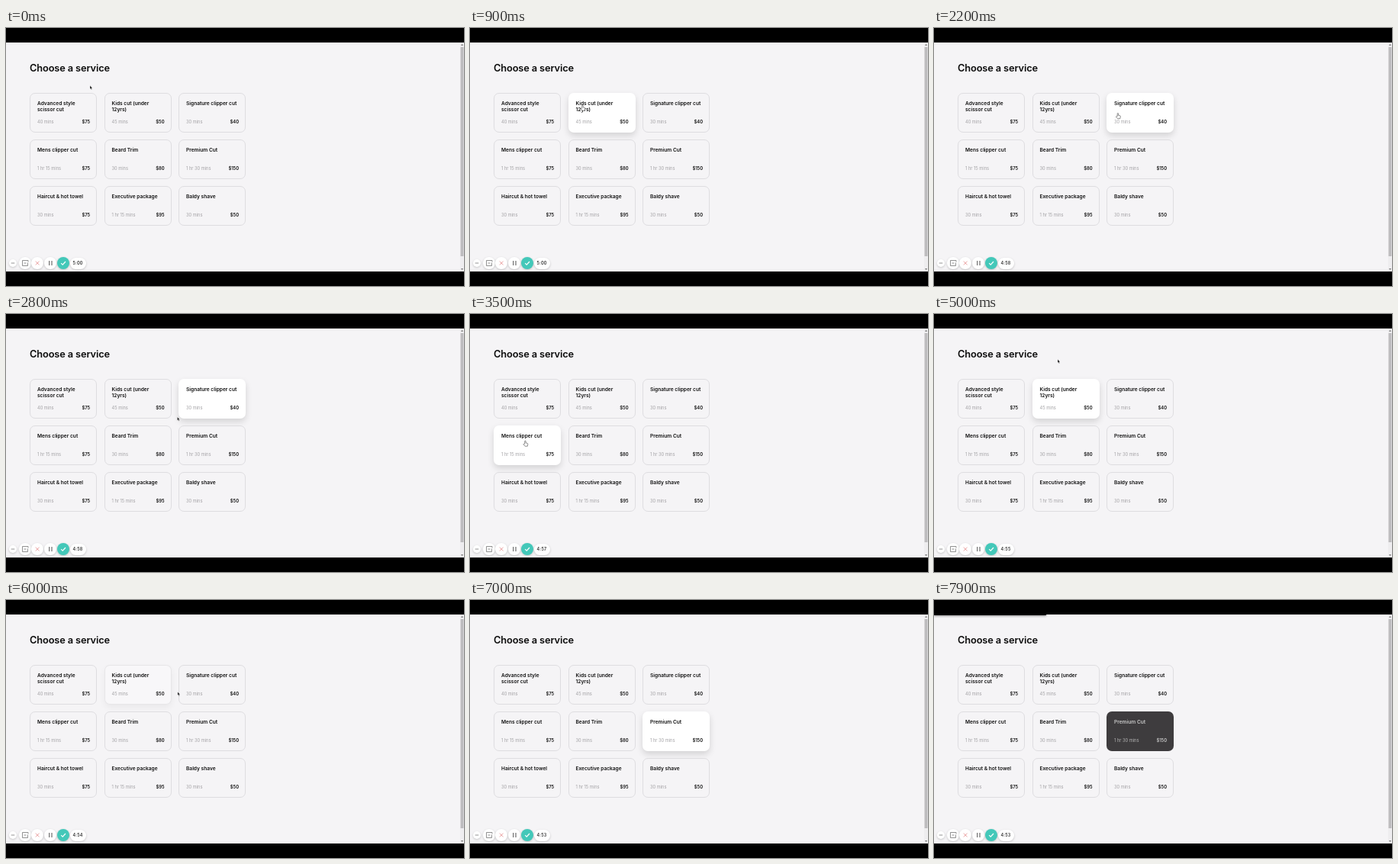
These frames come from a looping animation (600 by 338 pixels, 8 s). An HTML page:

```html
<!DOCTYPE html>
<html lang="en">
<head>
<meta charset="utf-8">
<title>Choose a service</title>
<style>
html, body { margin: 0; width: 100%; height: 100%; overflow: hidden; background: #000; }
#stage { position: relative; width: 600px; height: 338px; overflow: hidden; background: #000; font-family: Inter, sans-serif; color: #111; }
#stage * { position: absolute; box-sizing: border-box; white-space: nowrap; }
#page { left: 0; top: 19px; width: 600px; height: 300px; background: #f5f4f6; }
h1 { margin: 0; left: 31px; top: 44.5px; font: 600 12.8px/16px Inter, sans-serif; letter-spacing: -.01em; color: #0c0c0c; }
.card { width: 88px; height: 51.5px; border: 1px solid; border-radius: 7px; }
.card * { line-height: 8px; }
.name { left: 9px; top: 8.8px; font-size: 6.6px; font-weight: 600; }
.time { left: 9px; top: 32.8px; font-size: 5.7px; }
.price { right: 8px; top: 32.8px; font-size: 5.8px; font-weight: 600; }
#stage br { position: static; }
.tool { background: #fff; border-radius: 8px; box-shadow: 0 1px 3px rgba(0, 0, 0, .2); }
#clock { left: 83.5px; top: 300.5px; width: 21px; height: 15px; text-align: center; font-size: 5.5px; font-weight: 600; line-height: 15px; letter-spacing: .2px; color: #333; }
#bar { left: 0; top: 17px; height: 3px; background: #000; box-shadow: 0 1px 3px rgba(0, 0, 0, .45); }
svg { left: 0; top: 0; }
</style>
</head>
<body>
<div id="stage">
  <div id="page"></div>
  <div id="bar"></div>
  <h1>Choose a service</h1>
  <div id="cards"></div>
  <div id="tools"></div>
  <div class="tool" id="clock"></div>
  <svg width="600" height="338" fill="none">
    <path fill="#eeedef" d="M595 19h5v300h-5z"/>
    <path fill="#bdbcbe" d="M595.5 25h4v274h-4z"/>
    <path fill="#777" d="M596 23l1.5-2 1.5 2zM596 315l1.5 2 1.5-2z"/>
    <g stroke="#777" stroke-width=".8">
      <path d="M6.7 308h4.6"/>
      <path d="M27 304.5h-5.5v7h7v-4M23.5 308h3M27 304.5h2v2"/>
      <path stroke="#e58a8a" d="M38.8 305.6l4.8 4.8m0-4.8l-4.8 4.8"/>
      <path stroke-width="1.3" d="M56.7 305v6M60 305v6"/>
      <path stroke="#fff" stroke-width="1.2" d="M72.2 308.2l2 2 3.8-4.2"/>
    </g>
    <g id="cursor">
      <path id="arrow" fill="#111" stroke="#fff" stroke-width=".3" d="M0 0v4.4l1-.9.8 1.7.8-.4-.8-1.6h1.4z"/>
      <path id="hand" fill="#fff" stroke="#444" stroke-width=".6" d="M-.8 4.2V.8a.7.7 0 0 1 1.4 0v2.1l1.9.4q.9.2.8 1.2l-.5 2.7h-3.2l-2.2-2.4q.2-1 1.8-.6z"/>
    </g>
  </svg>
</div>
<script>
const $ = id => document.getElementById(id);
const LOOP = 8000, STEP = 100, CLICK = 7700, PREMIUM = 5;
const W = 88, H = 51.5;

const services = [
  ['Advanced style<br>scissor cut', '40 mins', '$75'],
  ['Kids cut (under<br>12yrs)', '45 mins', '$50'],
  ['Signature clipper cut', '30 mins', '$40'],
  ['Mens clipper cut', '1 hr 15 mins', '$75'],
  ['Beard Trim', '30 mins', '$80'],
  ['Premium Cut', '1 hr 30 mins', '$150'],
  ['Haircut &amp; hot towel', '30 mins', '$75'],
  ['Executive package', '1 hr 15 mins', '$95'],
  ['Baldy shave', '30 mins', '$50']
];

// time, x, y of the pointer tip
const path = [
  [0, 110, 75.5], [500, 140, 98], [900, 147.5, 101], [1300, 158, 106],
  [1800, 238, 109], [2200, 241, 111.5], [2700, 240, 127], [3000, 180, 158],
  [3200, 85, 165], [3500, 72.5, 166], [3800, 76, 120], [4100, 140, 110],
  [4700, 150, 110], [4900, 157, 92], [5000, 162, 59.5], [5300, 162, 59.5],
  [5600, 190, 75], [5900, 218, 112], [6300, 262, 166], [6500, 268, 170]
];

const cards = services.map(([name, time, price], i) => {
  const x = 31 + i % 3 * 97.5, y = 85 + Math.floor(i / 3) * 61;
  const el = document.createElement('div');
  el.className = 'card';
  el.style.left = x + 'px';
  el.style.top = y + 'px';
  el.innerHTML = `<div class="name">${name}</div><div class="time">${time}</div><div class="price">${price}</div>`;
  $('cards').append(el);
  return { el, x, y };
});

$('tools').innerHTML = [[9, 5], [25, 8], [41, 8], [58, 8], [75, 8, '#43c8b9']].map(([x, r, color = '#fff']) =>
  `<div class="tool" style="left:${x - r}px;top:${308 - r}px;width:${2 * r}px;height:${2 * r}px;background:${color}"></div>`).join('');

const clamp = v => Math.max(0, Math.min(1, v));
const mix = (a, b, p) => `rgb(${a.map((v, i) => Math.round(v + (b[i] - v) * p))})`;
const gray = v => [v, v, v];

function pointer(t) {
  const i = path.findIndex(k => k[0] > t);
  if (i === 0) return path[0].slice(1);
  if (i < 0) return path[path.length - 1].slice(1);
  const [t0, x0, y0] = path[i - 1], [t1, x1, y1] = path[i];
  const p = (t - t0) / (t1 - t0), e = p * p * (3 - 2 * p);
  return [x0 + (x1 - x0) * e, y0 + (y1 - y0) * e];
}

const inside = (c, [x, y]) => x >= c.x && x <= c.x + W && y >= c.y && y <= c.y + H;

// Hover fades linearly, trailing the pointer
const hover = (c, t) => [1, 2, 3].filter(k => inside(c, pointer(t - k * STEP))).length / 3;

function draw(t) {
  cards.forEach((c, i) => {
    const h = hover(c, t);
    const d = i === PREMIUM ? clamp((t - CLICK) / 200) : 0;
    const s = c.el.style, [name, time, price] = c.el.children;
    s.background = d ? mix(gray(255), [62, 60, 62], d) : `rgba(255,255,255,${h})`;
    s.borderColor = `rgba(222,221,224,${1 - h})`;
    s.boxShadow = `0 4px 9px rgba(0,0,0,${.14 * h * (1 - d)})`;
    name.style.color = price.style.color = mix(gray(17), gray(200), d);
    time.style.color = mix([162, 161, 164], gray(182), d);
  });

  const p = pointer(t), over = cards.some(c => inside(c, p));
  $('cursor').setAttribute('transform', `translate(${p})`);
  $('cursor').style.display = t < 6900 ? '' : 'none';
  $('hand').style.display = over ? '' : 'none';
  $('arrow').style.display = over ? 'none' : '';

  const left = 300 - Math.floor(t / 1000);
  $('clock').textContent = Math.floor(left / 60) + ':' + String(left % 60).padStart(2, '0');

  const load = clamp((t - CLICK) / 200);
  $('bar').style.width = 147 * load + 'px';
  $('bar').style.display = load ? '' : 'none';
}

const start = performance.now();
function frame() {
  const t = (performance.now() - start) % LOOP;
  draw(Math.floor(t / STEP) * STEP);
  requestAnimationFrame(frame);
}
frame();
</script>
</body>
</html>
```
